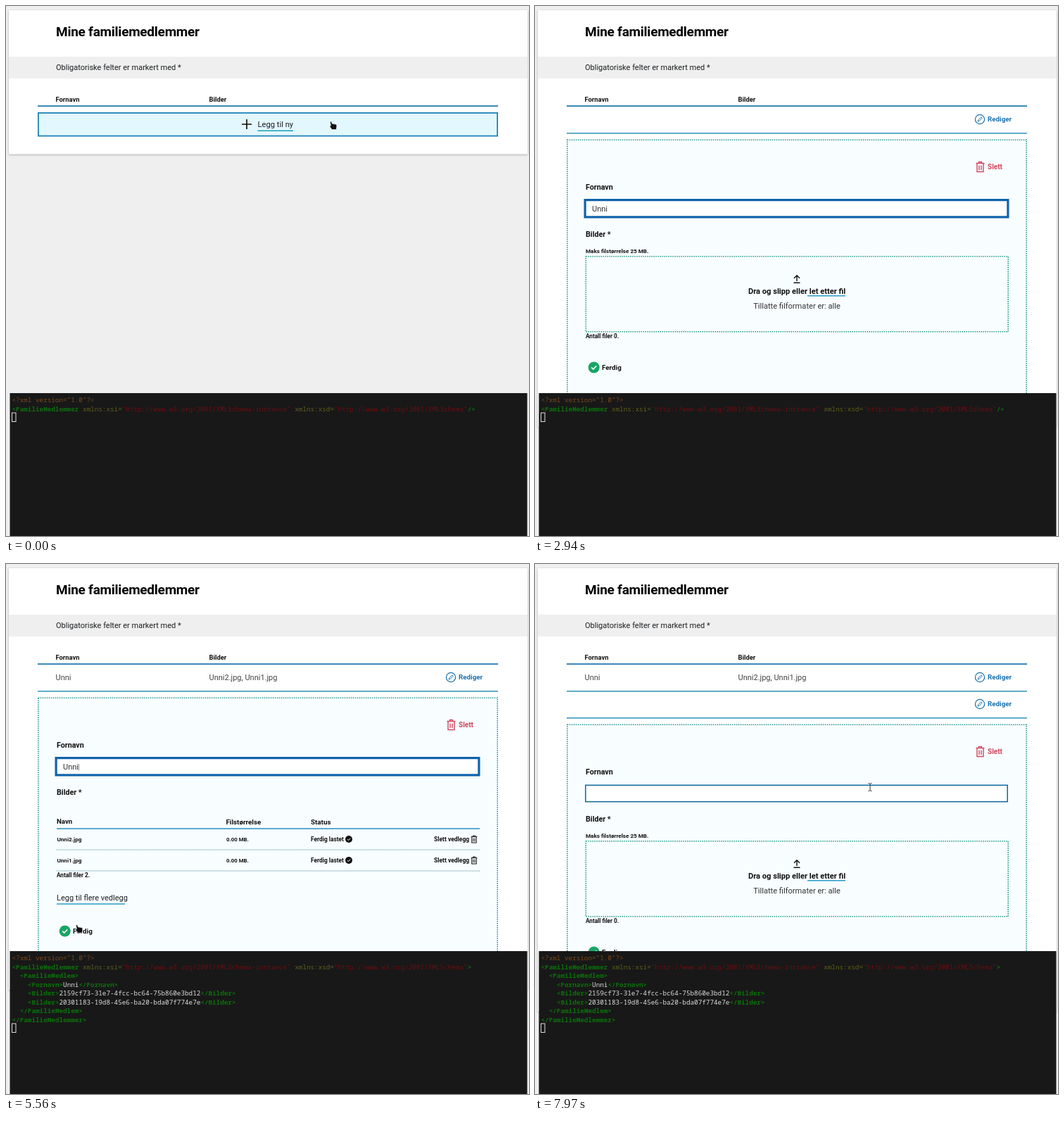
These frames come from a looping animation (743x753 px, 8 s). An HTML page:

```html
<!DOCTYPE html>
<html lang="no">
<head>
<meta charset="utf-8">
<style>
  html, body { margin: 0; width: 100%; height: 100%; overflow: hidden; background: #efefef; }
  svg { display: block; }
  text { font-family: Roboto, sans-serif; white-space: pre; }
  .mono { font-family: "Noto Sans Mono", monospace; font-size: 9.3px; }
  .card { filter: drop-shadow(0 1px 1.5px #0004); }
</style>
</head>
<body>
<svg id="stage" width="743" height="753" viewBox="0 0 743 753"></svg>
<script>
const LOOP = 8000, ROW = 38;
const NAME = 'Unni', FILES = [NAME + '2.jpg', NAME + '1.jpg'];
const IDS = ['2159cf73-31e7-4fcc-bc64-75b860e3bd12', '20301183-19d8-45e6-ba20-bda07f774e7e'];
const KEYS = [1750, 1940, 2120, 2300];
const AT = { open: 480, focus: 1300, saved: 3200, files: 4250, stored: 4400, done: 5600, hover: 7090, reopen: 7380 };
const BLUE = '#1b72b0', TEAL = '#1f9494', INK = '#1c1f22';

// time, x, y, shape from this time on
const POINTER = [
  [0, 464, 170, 'hand'], [450, 464, 170, 'hand'], [520, 462, 176, 'arrow'], [850, 420, 262, 'arrow'],
  [960, 404, 288, 'beam'], [1090, 398.5, 293.5, 'beam'], [1690, 398.5, 293.5, 'none'],
  [3300, 398, 293, 'arrow'], [3650, 738, 420, 'arrow'], [4150, 430, 410, 'arrow'],
  [4300, 430, 410, 'arrow'], [4560, 534, 393, 'arrow'], [4700, 534, 393, 'arrow'],
  [5200, 103, 518.5, 'hand'], [5600, 103, 518.5, 'arrow'], [6290, 103, 518.5, 'arrow'],
  [6700, 330, 357, 'arrow'], [6850, 390, 298, 'arrow'], [7040, 439, 188.5, 'arrow'],
  [7090, 448, 196, 'hand'], [7160, 462, 206, 'hand'], [7380, 462, 206, 'arrow'],
  [7600, 464, 220, 'arrow'], [7850, 474, 296, 'arrow'], [7910, 476, 314, 'beam'], [7970, 476, 317, 'beam'],
];

const SHAPES = {
  none: '',
  arrow: '<path d="M0 0V11.5L2.7 9.2L4.5 13.2L6.4 12.3L4.7 8.5H8Z" fill="#111" stroke="#fff" stroke-width=".7"/>',
  hand: '<path d="M-3.5 -5.5q1.3 -1 2 .4l1 2.4l5 .8q1.7 .5 1.4 2.5l-.7 5h-6.2l-3 -4.3q-.4 -1.7 1.4 -1.1z" fill="#111" stroke="#fff" stroke-width=".6"/>',
  beam: '<path d="M-2.5 -5.5q2 0 2.5 1q.5 -1 2.5 -1M0 -4.5V4.5M-2.5 5.5q2 0 2.5 -1q.5 1 2.5 1" fill="none" stroke="#333"/>',
};

const esc = s => s.replace(/&/g, '&amp;').replace(/</g, '&lt;');
// y is the middle of the capitals
const text = (x, y, size, s, { bold, fill = INK, anchor = 'start' } = {}) =>
  `<text x="${x}" y="${y + size * .36}" font-size="${size}" fill="${fill}" text-anchor="${anchor}" font-weight="${bold ? 700 : 400}">${s}</text>`;
const bold = (x, y, size, s, fill = '#111') => text(x, y, size, s, { bold: true, fill });
const rect = (x1, y1, x2, y2, fill, extra = '') =>
  `<rect x="${x1}" y="${y1}" width="${x2 - x1}" height="${y2 - y1}" fill="${fill}" ${extra}/>`;
const box = (x1, y1, x2, y2, fill, color, width = 2, dash = '') =>
  rect(x1 + width / 2, y1 + width / 2, x2 - width / 2, y2 - width / 2, fill,
    `stroke="${color}" stroke-width="${width}" stroke-dasharray="${dash}"`);
const dottedBox = (x1, y1, x2, y2, fill, color) => box(x1, y1, x2, y2, fill, color, 1.6, '1.5 1.5');
const line = (x1, x2, y, color, width, dash = '') =>
  `<path d="M${x1} ${y}H${x2}" stroke="${color}" stroke-width="${width}" stroke-dasharray="${dash}"/>`;
const icon = (x, y, d, color, width = 1.3, scale = 1) =>
  `<path transform="translate(${x} ${y}) scale(${scale})" d="${d}" fill="none" stroke="${color}" stroke-width="${width}"/>`;
const trash = (x, y, color, scale) =>
  icon(x, y, 'M-6 -5H6M-2 -5V-7H2V-5M-4.5 -5V7H4.5V-5M-1.5 -2V4.5M1.5 -2V4.5', color, 1.4, scale);
const check = (x, y, r, color) => `<circle cx="${x}" cy="${y}" r="${r}" fill="${color}"/>` +
  icon(x, y, 'M-3.5 0L-1 2.6L3.6 -2.2', '#fff', 1.6, r / 8);

function tableRow(y, name, files) {
  return text(70.5, y, 11, name, { fill: '#444' }) + text(288.5, y, 11, files, { fill: '#444' }) +
    `<circle cx="632" cy="${y}" r="6.6" fill="none" stroke="${BLUE}" stroke-width="1.2"/>` +
    icon(632, y, 'M-3 3L-2.3 .8L1.8 -3.2L3.2 -1.8L-.8 2.3Z', BLUE, 1) +
    bold(643, y - .5, 9.8, 'Rediger', BLUE) + line(45, 699, y + 19.8, '#2f93b8', 1.4);
}

function addButton(y, hover) {
  const frame = hover ? box(45, y - 17, 699, y + 17.5, '#e3f7ff', '#1f83b8', 1.8)
    : dottedBox(45, y - 16.5, 699, y + 17.5, '#fff', TEAL);
  return frame + icon(342, y, 'M-7 0H7M0 -7V7', '#111', 1.7) +
    text(357.5, y, 11.2, 'Legg til ny') + line(357.5, 408, y + 9.3, '#18a0b4', 1.5);
}

function dropZone() {
  return bold(72, 348, 8.1, 'Maks filstørrelse 25 MB.') + dottedBox(71.5, 355, 673, 463.5, '#f8fdff', '#1f9a86') +
    icon(372, 388, 'M-4.5 5.3H4.5M0 3V-5M-4 -1.3L0 -5.3L4 -1.3', '#111', 1.4) +
    bold(303, 405, 11.1, 'Dra og slipp eller let etter fil') + line(387, 441, 411.8, '#2a9cc8', 1.5) +
    text(372, 426, 11.1, 'Tillatte filformater er: alle', { anchor: 'middle', fill: '#333' }) +
    bold(72, 469, 8.2, 'Antall filer 0.');
}

function fileList() {
  const rows = FILES.map((file, i) => {
    const y = 391 + 30 * i;
    return bold(72.5, y, 8.1, file) + bold(313, y, 7.8, '0.00 MB.') + bold(433, y, 8.35, 'Ferdig lastet') +
      check(487, y, 5, '#111') + bold(608, y, 8.5, 'Slett vedlegg') + trash(665, y, '#111', .72) +
      line(72, 673, y + 15, '#4a8f9c', 1, '1 1');
  });
  return bold(72, 366, 9.7, 'Navn') + bold(312.5, 366, 9.8, 'Filstørrelse') + bold(433, 366, 9.8, 'Status') +
    line(72, 673, 376, '#2a8fc0', 1.5) + rows.join('') + bold(72, 442, 8.2, 'Antall filer 2.') +
    text(72, 474, 11, 'Legg til flere vedlegg') + line(72, 169, 483, '#2a9cc8', 1.5);
}

function form(dy, { name = '', focused, caret, files }) {
  const end = files ? 521 : 513;
  const field = focused ? box(69.5, 274, 673.5, 301.5, '#fff', '#0f62ab', 3.2) : box(71, 275.5, 672, 300.5, '#fff', '#1d6f9f', 1.6);
  return `<g transform="translate(0 ${dy})">` +
    dottedBox(45, 189.5, 699, end + 58, '#f8fdff', TEAL) +
    trash(632.5, 228.5, '#d0475f', 1) + bold(643, 228, 10, 'Slett', '#d0475f') +
    bold(72, 257.5, 10.7, 'Fornavn') + field +
    text(81, 288, 11, name + (caret ? '<tspan dx="-.8" font-weight="300">|</tspan>' : ''), { fill: '#333' }) +
    bold(72, 324.5, 10.7, 'Bilder *') + (files ? fileList() : dropZone()) +
    check(83.7, end + .5, 8, '#18a566') + bold(95, end, 9.8, 'Ferdig') + '</g>';
}

function terminal(saved, stored) {
  const paint = (color, weight) => s => `<tspan fill="${color}" font-weight="${weight}">${esc(s)}</tspan>`;
  const tag = paint('#0b700b', 700), attr = paint('#5f5f1a', 400), str = paint('#6c0d10', 400), val = paint('#ddd', 400);
  const schema = 'http://www.w3.org/2001/XMLSchema';
  const leaf = (el, s) => '    ' + tag(`<${el}>`) + val(s) + tag(`</${el}>`);
  const lines = [
    paint('#7a491c', 400)('<?xml version="1.0"?>'),
    tag('<FamilieMedlemmer') + attr(' xmlns:xsi=') + str(`"${schema}-instance"`) +
      attr(' xmlns:xsd=') + str(`"${schema}"`) + tag(saved ? '>' : '/>'),
  ];
  if (saved) lines.push('  ' + tag('<FamilieMedlem>'), leaf('Fornavn', NAME),
    ...(stored ? IDS.map(id => leaf('Bilder', id)) : []),
    '  ' + tag('</FamilieMedlem>'), tag('</FamilieMedlemmer>'));
  const y = 560 + 12.5 * lines.length;
  return rect(5.5, 550, 740.5, 753, '#181818') +
    lines.map((s, i) => `<text class="mono" x="8.5" y="${563 + 12.5 * i}">${s}</text>`).join('') +
    box(8, y - 7.5, 14.5, y + 6, 'none', '#ddd', 1);
}

function pointer(t) {
  const i = POINTER.findLastIndex(p => p[0] <= t);
  const [t0, x0, y0, shape] = POINTER[i], [t1, x1, y1] = POINTER[i + 1] || [LOOP, x0, y0];
  const k = (t - t0) / (t1 - t0), mix = (a, b) => (a + (b - a) * k).toFixed(1);
  return `<g transform="translate(${mix(x0, x1)} ${mix(y0, y1)})">${SHAPES[shape]}</g>`;
}

function scene(t) {
  const first = t >= AT.open && t < AT.done, second = t >= AT.reopen;
  const saved = t >= AT.saved, files = t >= AT.files;
  const rows = (t >= AT.open) + second;
  const dy = ROW * (rows - 1);
  const typed = KEYS.filter(k => t >= k).length;
  const lastKey = typed ? KEYS[typed - 1] : AT.focus;
  const focused = t >= AT.focus;
  const bottom = first ? (files ? 605 : 598) : second ? 598 + dy : 210.5 + ROW * rows;

  let s = rect(4, 6, 741, bottom, '#fff', 'class="card" rx="1"') + rect(4, 72, 741, 103, '#efefef') +
    `<g letter-spacing="-.25">${bold(71, 36.5, 19, 'Mine familiemedlemmer', '#000')}</g>` +
    text(71, 87, 11, 'Obligatoriske felter er markert med *') +
    bold(70.5, 132.5, 9.4, 'Fornavn') + bold(288.5, 132.5, 9.4, 'Bilder') + line(45, 699, 142.2, '#1f78ad', 1.8);
  if (rows) s += tableRow(161, saved ? NAME : '', files ? FILES.join(', ') : '');
  if (second) s += tableRow(161 + ROW, '', '');
  if (first) s += form(0, { name: NAME.slice(0, typed), focused, files, caret: focused && (t - lastKey) % 1000 < 500 });
  else if (second) s += form(dy, {});
  else s += addButton(168 + ROW * rows, !rows || t >= AT.hover);
  return s + terminal(saved, t >= AT.stored) + pointer(t);
}

const stage = document.getElementById('stage');
const start = performance.now();
let shown = '';
function draw() {
  const next = scene((performance.now() - start) % LOOP);
  if (next !== shown) stage.innerHTML = shown = next;
  requestAnimationFrame(draw);
}
draw();
</script>
</body>
</html>
```
